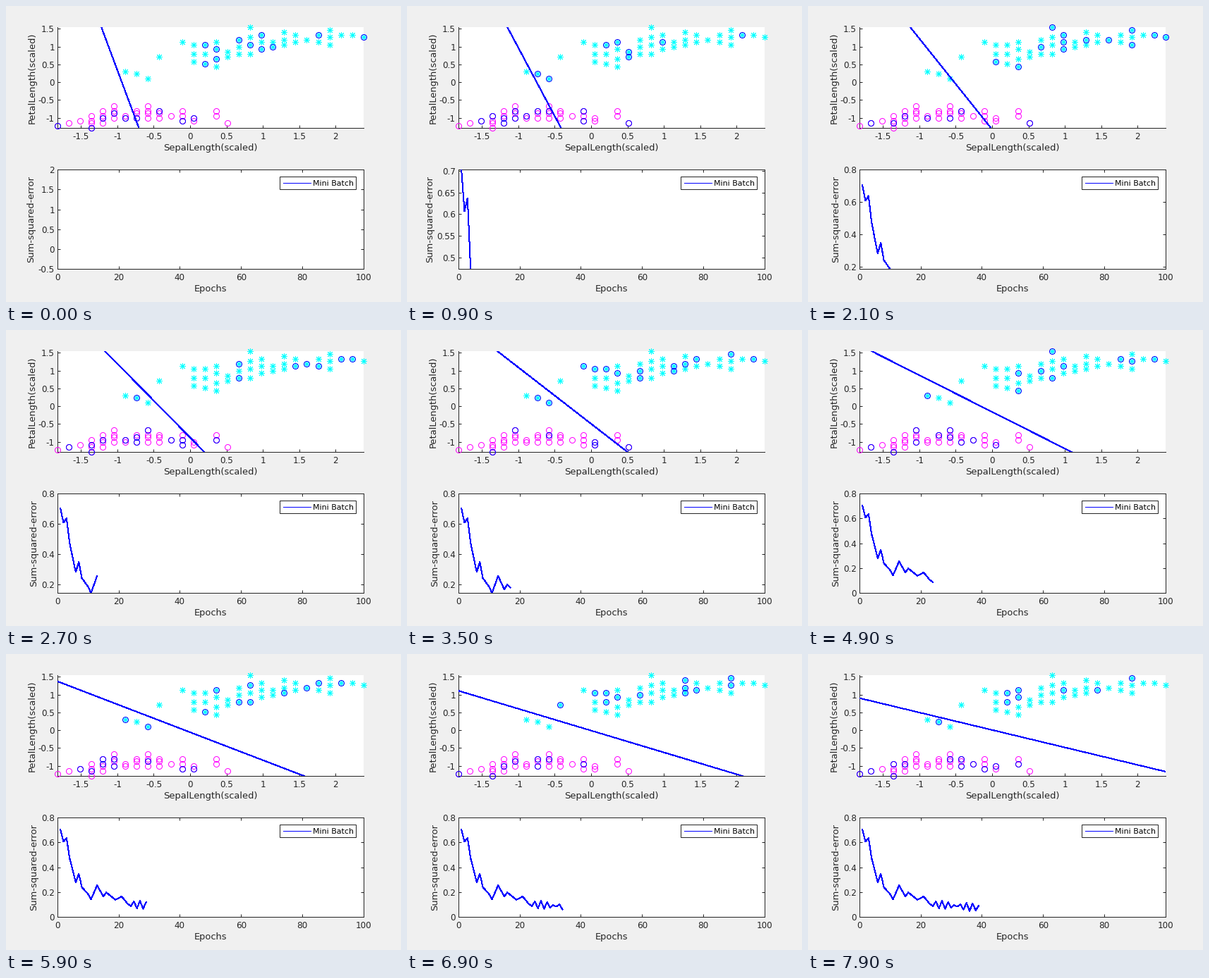
Write a matplotlib script that moves like this. It is 560 px wide and 420 px high and loops after 8000 ms.

```python
import random

import numpy as np
import matplotlib.pyplot as plt
from matplotlib.animation import FuncAnimation
from matplotlib.patches import Rectangle

W, H = 560, 420
PT = 0.72  # points per pixel at 100 dpi
INK = "#262626"
BLUE, MAGENTA, CYAN = "#0000ff", "#ff00ff", "#00ffff"
EPOCHS = 39
BATCH_SIZE = 20

plt.rcParams.update({
    "font.family": "DejaVu Sans",
    "axes.unicode_minus": False,
    "axes.linewidth": PT,
    "axes.edgecolor": INK,
})


def scale(sepal, petal):
    return (sepal / 10 - 5.471) / 0.6417, (petal / 10 - 2.861) / 1.4495


def cluster(columns, envelope, gap):
    """Fill each sepal column evenly between the envelope's two edges."""
    keys, low, high = zip(*envelope)
    dots = []
    for sepal in columns:
        lo = round(np.interp(sepal, keys, low))
        hi = round(np.interp(sepal, keys, high))
        count = 1 + int(np.ceil((hi - lo) / gap))
        dots += [scale(sepal, round(p)) for p in np.linspace(lo, hi, count)]
    return np.array(dots)


# Envelopes: sepal length, lowest and highest petal length, in millimetres
small = cluster(np.r_[43:56, 57, 58], [
    (43, 11, 11), (45, 13, 13), (46, 10, 15), (48, 14, 19), (49, 14, 15),
    (51, 14, 19), (53, 15, 15), (54, 13, 17), (55, 13, 14), (57, 15, 17),
    (58, 12, 12)], gap=2)
large = cluster(np.r_[49:53, 54:71], [
    (49, 33, 33), (51, 30, 30), (52, 39, 39), (54, 45, 45), (55, 37, 44),
    (57, 35, 45), (58, 39, 41), (60, 40, 51), (62, 43, 45), (63, 44, 49),
    (65, 46, 46), (67, 44, 50), (68, 48, 48), (70, 47, 47)], gap=4)
everything = np.vstack([small, large])
(X0, Y0), (X1, Y1) = scale(43, 10), scale(70, 51)


def error_curve():
    """A bumpy descent that ends in a beating tremor."""
    n = np.arange(1, EPOCHS + 1)
    turns = [1, 2, 3, 4, 6, 7, 8, 10, 11, 13, 15, 16, 19, 21, 23, EPOCHS]
    heights = [.703, .607, .637, .4735, .28, .348, .24, .185, .142, .255,
               .165, .197, .138, .165, .105, .075]
    tremor = -0.032 * np.cos(np.pi * n) * abs(np.cos(np.pi * n / 9))
    return np.interp(n, turns, heights) + np.where(n > 23, tremor, 0)


error = error_curve()


def boundary_ends(epoch):
    """Where the decision line meets the top and bottom of the plot."""
    top = -1.117 - 0.0021 * (epoch - 8) ** 2
    bottom = -0.585 + 0.0503 * epoch + 0.00083 * epoch ** 2 - 0.17 / epoch
    return top, bottom


fig = plt.figure(figsize=(W / 100, H / 100), dpi=100, facecolor="#f0f0f0")


def make_axes(top, bottom, box):
    ax = fig.add_axes([72.8 / W, 1 - bottom / H, 434 / W, (bottom - top) / H])
    ax.tick_params(direction="in", length=4.3 * PT, width=PT, color=INK,
                   labelcolor=INK, labelsize=12 * PT, top=box, right=box)
    ax.tick_params(axis="x", pad=6 * PT)
    ax.tick_params(axis="y", pad=4 * PT)
    ax.spines[["top", "right"]].set_visible(box)
    return ax


def set_ticks(axis, lo, hi, step):
    n = np.arange(np.ceil(lo / step - 1e-6), np.floor(hi / step + 1e-6) + 1)
    values = np.round(n * step, 3) + 0.0
    labels = [f"{v:g}" for v in values]
    axis.set_ticks(values, labels)
    axis.axes.set(**{f"{axis.axis_name}lim": (lo, hi)})
    return labels


def markers(xy, shape, color, size):
    return scatter_ax.plot(*xy.T, ls="none", marker=shape, color=color,
                           mfc="none", ms=size * PT, mew=PT, clip_on=False,
                           antialiased=False, zorder=3)[0]


def line(ax):
    return ax.plot([], [], color=BLUE, lw=PT, antialiased=False, zorder=3)[0]


scatter_ax = make_axes(30.1, 173.1, False)
error_ax = make_axes(232.1, 373.1, True)
set_ticks(scatter_ax.xaxis, X0, X1, 0.5)
set_ticks(scatter_ax.yaxis, Y0, Y1, 0.5)
set_ticks(error_ax.xaxis, 0, 100, 20)

markers(small, "o", MAGENTA, 8)
markers(large, (8, 2, 0), CYAN, 9)
batch = markers(everything[:1], "o", BLUE, 8)
boundary = line(scatter_ax)
curve = line(error_ax)

# Pixel-space layer for labels and legend
layer = fig.add_axes([0, 0, 1, 1], zorder=5)
layer.set(xlim=(0, W), ylim=(H, 0))
layer.axis("off")


def label(x, y, text, angle=0):
    return layer.text(x, y, text, size=13 * PT, color=INK, ha="center",
                      va="baseline", rotation=angle, rotation_mode="anchor")


label(290, 205, "SepalLength(scaled)")
label(290, 405, "Epochs")
label(40.5, 102.5, "PetalLength(scaled)", 90)
error_label = label(39, 302.5, "Sum-squared-error", 90)
layer.add_patch(Rectangle((388.1, 242.1), 108, 18, fc="white", ec=INK,
                          lw=PT))
layer.plot([393, 432], [251.1, 251.1], color=BLUE, lw=PT)
layer.text(435, 255, "Mini Batch", size=11 * PT, color="black")


def error_range(epoch):
    """Limits and tick step of the error plot."""
    if epoch == 1:
        return -0.5, 2, 0.5
    lo, hi = error[:epoch].min(), error[:epoch].max()
    span = hi - lo
    if span > 0.5:
        return (lo if lo > 0.2 * hi else 0), 0.8, 0.2
    return lo, hi, 0.02 if span < 0.1 else 0.05 if span < 0.26 else 0.1


def text_width(text):
    em = {".": 0.318, "-": 0.361}
    return 12 * sum(em.get(c, 0.636) for c in text)


def update(frame):
    t = frame * 100
    epoch = 1 if t < 500 else (t - 500) // 200 + 2

    rng = random.Random(epoch)
    chosen = rng.sample(range(len(everything)), BATCH_SIZE)
    batch.set_data(*everything[chosen].T)

    boundary.set_data(boundary_ends(epoch), [Y1, Y0])
    curve.set_data(np.arange(1, epoch + 1), error[:epoch])
    labels = set_ticks(error_ax.yaxis, *error_range(epoch))
    error_label.set_x(62.5 - max(map(text_width, labels)))
    return batch, boundary, curve, error_label


anim = FuncAnimation(fig, update, frames=80, interval=100, repeat=True,
                     repeat_delay=0, blit=False)
plt.show()
```
